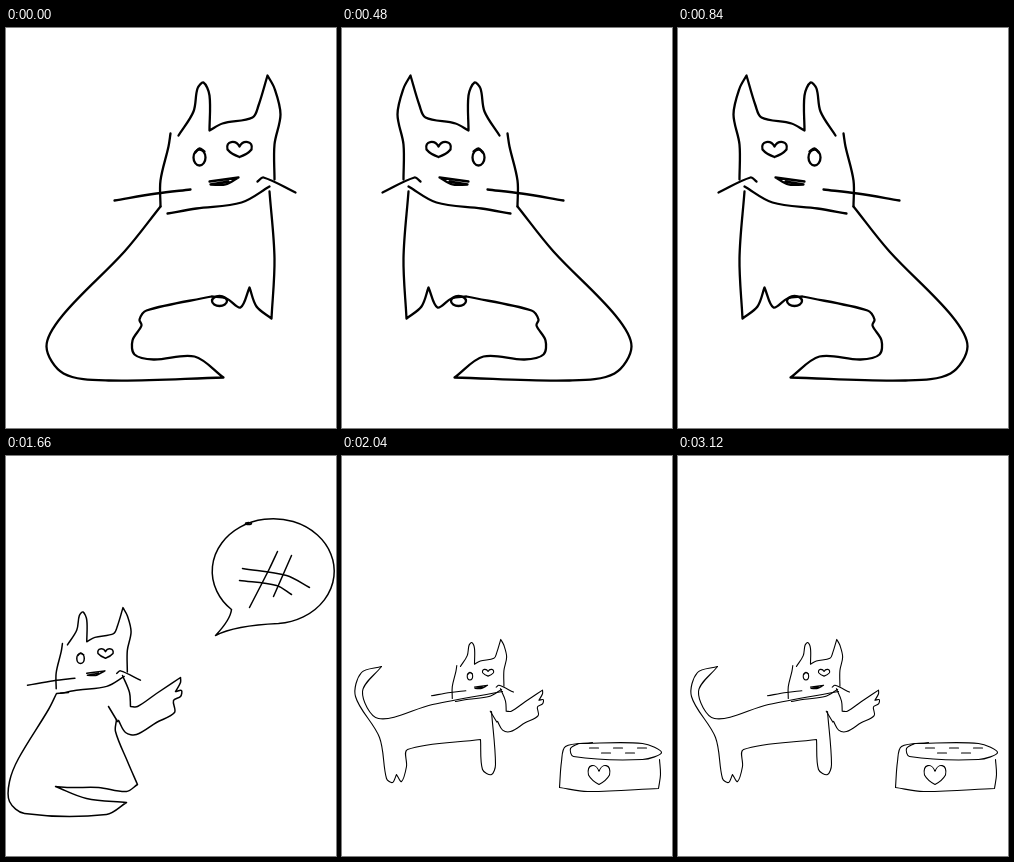
Recreate the animation shown at these times as an HTML page. Size 330 by 400 pixels, loop 3.84 s.

```html
<!DOCTYPE html>
<html lang="en">
<head>
<meta charset="utf-8">
<title>Cat doodle</title>
<style>
  html, body { margin: 0; width: 100%; height: 100%; overflow: hidden; background: #fff; }
  svg { display: block; width: 100vw; height: 100vh; }
  path { fill: none; stroke: #000; stroke-linecap: round; stroke-linejoin: round; vector-effect: non-scaling-stroke; }
</style>
</head>
<body>
<svg id="stage" viewBox="-.5 -.5 330 400"></svg>
<script>
const stage = document.getElementById('stage');

function add(parent, tag, attrs) {
  const el = document.createElementNS('http://www.w3.org/2000/svg', tag);
  for (const key in attrs) el.setAttribute(key, attrs[key]);
  return parent.appendChild(el);
}

const oval = (x, y, rx, ry) => `M${x - rx} ${y}a${rx} ${ry} 0 1 1 ${2 * rx} 0a${rx} ${ry} 0 1 1 ${-2 * rx} 0`;

function heart(x, y, w, h) {
  const p = (u, v) => `${x + u * w} ${y + v * h} `;
  const half = s => `M${p(0, -.2)}C${p(s * .15, -.65)}${p(s * .6, -.6)}${p(s * .5, 0)}Q${p(s * .35, .3)}${p(0, .5)}`;
  return half(-1) + half(1);
}

// Smooth line through key points; "/" makes the point before it a sharp corner.
function curve(stroke) {
  let d = '', last = null;
  for (const part of stroke.split(' / ')) {
    const pts = part.split(' ').map(p => p.split(',').map(Number));
    if (last) pts.unshift(last);
    else d = 'M' + pts[0];
    const gap = i => Math.hypot(pts[i + 1][0] - pts[i][0], pts[i + 1][1] - pts[i][1]);
    const slope = (i, k) => i > 0 && i < pts.length - 1
      ? (pts[i + 1][k] - pts[i - 1][k]) / (gap(i) + gap(i - 1)) : null;
    for (let i = 0; i < pts.length - 1; i++) {
      const reach = gap(i) / 3;
      const handle = (j, sign) => pts[j].map((v, k) => {
        const m = slope(j, k) ?? (pts[i + 1][k] - pts[i][k]) / gap(i);
        return v + sign * m * reach;
      });
      d += `C${handle(i, 1)} ${handle(i + 1, -1)} ${pts[i + 1]}`;
    }
    last = pts[pts.length - 1];
  }
  return d;
}

function draw(parent, strokes, transform = '') {
  const g = add(parent, 'g', { transform });
  for (const s of strokes) add(g, 'path', { d: s[0] === 'M' ? s : curve(s) });
}

function scene(width, transform = '') {
  return add(stage, 'g', { 'stroke-width': width, transform, visibility: 'hidden' });
}

const head = [
  '164,105 162,118 154,152 154,178',
  '172,107 187,83 191,60 197,54 203,67 203,102 / 216,95 246,89 252,77 261,47 / 268,60 274,86 268,116 268,151',
  '161,185 190,180 235,174 263,158',
  '108,172 150,165 184,161',
  '251,153 257,149 289,164',
  oval(193, 129, 6, 8),
  '189,124 193,120 198,123',
  heart(233, 121, 24, 15),
  '203,153 232,149 / 219,156 204,156 / 222,153'
];

const sitting = [
  '154,178 118,223 56,287 40,318 57,345 102,352 217,349 / 188,328 147,331 128,326 126,312 135,297 133,291 140,282 205,268 / 220,270 234,279 243,259 / 250,278 265,290 / 268,230 263,163',
  oval(213, 272.5, 7.5, 5)
];

const arm = [
  '116,219 123,236 124,250 / 131,250 150,237 174,221 / 174,226 169,235 / 175,234 174,240 167,244 168,256 150,266 130,278 119,276 112,264',
  '102,250 111,265'
];

const seated = [
  '62,236 50,237 / 42,253 12,302 3,325 3,345 18,357 100,358 120,346 / 80,342 49,330 / 65,331 92,331 120,335 131,328 / 121,305 109,275 110,263'
];

const bubble = [
  'M225 153A61 52.5 0 1 1 272 167Q228 169 209 179Q224 163 225 153',
  oval(242, 67, 3, 1),
  '271,95 263,112 243,151',
  '285,99 267,140',
  '236,112 280,119 303,131',
  '233,124 270,129 285,138'
];

const standing = [
  '39,210 19,216 13,240 37,281 44,322 50,326 54,318 / 59,325 64,310 65,293 138,283 / 140,313 149,318 153,308 149,255',
  '39,210 20,235 36,262 90,248 160,235'
];

const dashes = Array.from({ length: 5 }, (_, i) => `M${247 + 12 * i} ${i % 2 ? 296.5 : 291.5}h9`);

const bowl = [
  '236,287 228,292 231,300 300,303 319,296 300,287 236,287',
  '250,286 223,290 219,305 217,331 / 245,335 316,332 / 318,318 317,303',
  heart(256.5, 318.5, 21, 19),
  ...dashes
];

function pointingCat(parent, transform = '') {
  const g = add(parent, 'g', { transform });
  draw(g, head, 'translate(-46.4 122) scale(.624 .62)');
  draw(g, arm);
}

const right = scene(2.3);
const left = scene(2.3, 'translate(329 0) scale(-1 1)');
for (const s of [right, left]) {
  draw(s, head);
  draw(s, sitting);
}

const asking = scene(1.5);
pointingCat(asking);
draw(asking, seated);
draw(asking, bubble);

const feeding = scene(1.1);
pointingCat(feeding, 'translate(73.7 73.2) scale(.726)');
draw(feeding, standing);
draw(feeding, bowl);

const steps = [[480, right], [1080, left], [2040, asking], [3840, feeding]];
const start = performance.now();

function render(now) {
  const t = Math.max(0, now - start) % 3840;
  const current = steps.find(([end]) => t < end)[1];
  for (const [, s] of steps) s.setAttribute('visibility', s === current ? 'visible' : 'hidden');
  requestAnimationFrame(render);
}
render(start);
</script>
</body>
</html>
```
